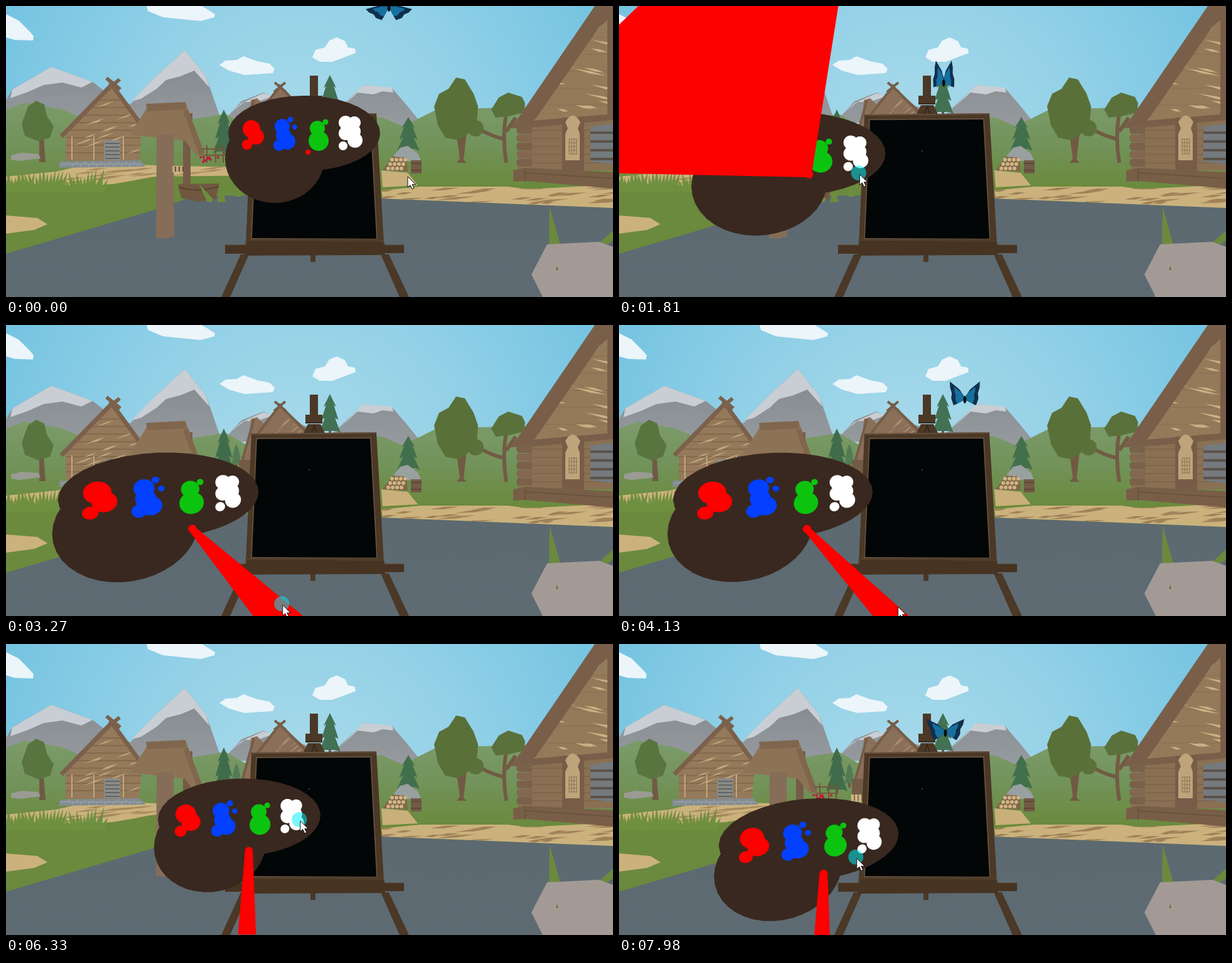
Write an HTML page with a canvas that moves like this. It is 967 by 464 pixels and loops after 8 s.

```html
<!DOCTYPE html>
<html lang="en">
<head>
<meta charset="utf-8">
<title>Palette and easel</title>
<style>
html, body { margin: 0; width: 100%; height: 100%; overflow: hidden; background: #5d6a72; }
canvas { display: block; width: 100vw; height: 100vh; }
</style>
</head>
<body>
<canvas id="stage" width="967" height="464"></canvas>
<script>
const W = 967, H = 464, LOOP = 8000, TAU = Math.PI * 2;
const ctx = document.getElementById('stage').getContext('2d');
const scene = document.createElement('canvas');
scene.width = W;
scene.height = H;
const bg = scene.getContext('2d');

let seed = 7;
const rand = () => (seed = (seed * 16807) % 2147483647) / 2147483647;

// ---- Scenery, painted once ----

function fill(color, d) {
  bg.fillStyle = color;
  bg.fill(new Path2D(d));
}
function line(color, width, d) {
  bg.strokeStyle = color;
  bg.lineWidth = width;
  bg.stroke(new Path2D(d));
}
function rows(color, width, x0, x1, y0, y1, step) {
  for (let y = y0; y <= y1; y += step) line(color, width, `M${x0} ${y}H${x1}`);
}
function disc(color, x, y, r) {
  bg.fillStyle = color;
  bg.beginPath();
  bg.arc(x, y, r, 0, TAU);
  bg.fill();
}
function gradient(y0, y1, ...colors) {
  const g = bg.createLinearGradient(0, y0, 0, y1);
  colors.forEach((c, i) => g.addColorStop(i / (colors.length - 1), c));
  return g;
}
// Thin tapered slivers scattered inside a clip shape.
function streaks(color, clip, n, x, y, w, h, len, tilt, thick) {
  bg.save();
  bg.clip(new Path2D(clip));
  for (let i = 0; i < n; i++) {
    const sx = x + rand() * w, sy = y + rand() * h, l = len * (.4 + rand());
    fill(color, `M${sx} ${sy}l${l / 2} ${l * tilt / 2 - thick}l${l / 2} ${l * tilt / 2 + thick}l${-l / 2} ${thick - l * tilt / 2}Z`);
  }
  bg.restore();
}
function grass(x, y, n, spread, height) {
  for (let i = 0; i < n; i++) {
    const lean = (i / (n - 1) - .5) * spread, h = height * (.5 + .5 * rand());
    fill('#6f903f', `M${x + lean * .7 - 5} ${y}L${x + lean} ${y - h}L${x + lean * .7 + 5} ${y}Z`);
  }
}
function pine(x, y, w, h, color) {
  let left = '', right = '';
  for (let i = 1; i <= 3; i++) {
    const yy = y + h * i / 3, half = w * (.2 + i * .1);
    right += `L${x + half} ${yy}L${x + half * .6} ${yy - 3}`;
    left = `L${x - half * .6} ${yy - 3}L${x - half} ${yy}` + left;
  }
  fill('#6c5843', `M${x - 2} ${y + h - 4}h4v8h-4Z`);
  fill(color, `M${x} ${y}${right}${left}Z`);
}

function sky() {
  const g = bg.createRadialGradient(470, 240, 40, 470, 240, 540);
  ['#a9daea', '#91d0e7', '#73c3e1'].forEach((c, i) => g.addColorStop(i / 2, c));
  bg.fillStyle = g;
  bg.fillRect(0, 0, W, H);
  const cloud = '#ebf5fa';
  fill(cloud, 'M0 13L20 23 38 41 44 48 43 55 14 54 0 50Z');
  fill(cloud, 'M224 0L226 8 250 18 310 24 332 18 333 13 312 0Z');
  fill(cloud, 'M340 94L350 87 368 86 378 80 400 88 420 92 428 100 425 107 380 110 355 103Z');
  fill(cloud, 'M488 82L493 70 508 66 515 55 527 50 540 56 545 66 556 68 557 75 520 89 500 89Z');
}

function mountains() {
  const rock = gradient(80, 200, '#84898f', '#979ca0'), snow = '#c8ced4';
  fill(rock, 'M0 150L10 133 72 97 138 121 175 150 210 160 210 210 0 210Z');
  fill(snow, 'M7 147L10 133 72 97 138 121 120 130 90 122 60 126 35 137Z');
  fill(rock, 'M195 160L238 113 285 70 319 113 342 180 342 200 195 200Z');
  fill(snow, 'M200 152L238 113 285 70 319 113 324 130 300 103 278 112 255 118 240 132 215 148Z');
  fill(rock, 'M345 185L375 152 410 138 425 145 490 165 490 190Z');
  fill(snow, 'M358 170L375 155 410 139 425 144 400 153 380 153Z');
  fill(rock, 'M515 178L570 126 615 131 640 160 668 195 515 200Z');
  fill(snow, 'M534 162L569 126 615 130 617 138 600 136 585 141 560 138Z');
}

function land() {
  fill(gradient(150, 290, '#7c9c6b', '#72935b', '#6a8a3c'),
    'M0 165L30 154 90 165 130 182 200 185 300 180 350 172 390 195 530 172 600 178 632 192 690 163 760 163 850 160 967 200V330H0Z');
  const road = 'M0 272L80 264 110 257 200 253 400 258V275H220L170 288 0 290Z';
  fill('#cbb27d', road);
  streaks('#a5875d', road, 24, 0, 258, 380, 28, 50, -.12, 1.5);
  fill('#6b8a3d', 'M0 286L80 289 170 284 240 272 400 270V310L240 340 0 400Z');
  fill(gradient(300, 464, '#5c6970', '#5e6b73'), 'M0 395L240 324 300 303 390 302 600 307 967 322V464H0Z');
  const lane = 'M598 294L660 288 800 288 830 292 967 285V322L600 307Z';
  fill('#cbb27d', lane);
  streaks('#a08158', lane, 34, 590, 288, 380, 30, 50, -.1, 2);
  fill('#c9b07a', 'M598 262L640 266 656 286 600 289Z');
  fill('#cbb27d', 'M0 334L50 338 66 348 45 357 0 363Z');
}

function trees() {
  fill('#6f5a45', 'M53 210h7l3 39h-10Z');
  fill('#59753f', 'M25 188L35 160 48 151 61 157 65 175 76 192 70 210 52 216 30 207Z');
  pine(347, 165, 34, 70, '#416c4b');
  pine(367, 190, 18, 35, '#527b55');
  pine(516, 110, 34, 62, '#427153');
  pine(641, 177, 36, 54, '#426f4c');
  line('#725b44', 6, 'M797 170Q790 210 797 250M793 212Q775 208 757 198M797 200L812 178');
  fill('#5b713b', 'M773 165L785 146 800 138 822 145 827 155 825 170 800 176 780 178Z');
  disc('#5b713b', 748, 195, 13);
  fill('#715a43', 'M717 200H734L729 245 734 250H718L723 243Z');
  fill('#5a7039', 'M682 160L690 140 705 132 717 114 731 117 745 140 752 160 750 185 735 205 720 214 700 210 688 190Z');
  fill('#9a9b93', 'M8 238L25 234 52 236 55 243 20 247 8 245Z');
}

function leftHouse() {
  const wall = 'M169 128L216 195 212 247H95V205Z';
  fill('#94795a', wall);
  bg.save();
  bg.clip(new Path2D(wall));
  rows('#7f6549', 1.5, 95, 215, 150, 240, 12);
  bg.restore();
  streaks('#c2a87d', wall, 20, 100, 145, 100, 100, 26, -.35, 1.2);
  for (const x of [105, 140, 187]) line('#c2a87d', 2, `M${x} 208V245`);
  line('#7b614c', 7, 'M172 122L88 208M166 122L212 185');
  line('#7b614c', 6, 'M160 115L182 133M181 117L159 135');
  fill('#8b8b85', 'M156 214h26v32h-26Z');
  rows('#5e6469', 2, 158, 181, 219, 243, 6);
  fill('#838c93', 'M86 248L214 246 222 256 84 258Z');
  line('#a2a9ad', 1, 'M86 252H218');
  for (let x = 100; x < 215; x += 13) line('#a2a9ad', 1, `M${x} 248v4m6 0v5`);
}

function well() {
  fill('#755b46', 'M284 171h13v38h-13ZM282 196h12v88h-12Z');
  fill('#8d7356', 'M226 160L287 156 316 236 303 238 285 215 198 205Z');
  fill('#80664d', 'M223 156L286 153 287 165 225 168ZM282 168L290 165 316 234 308 238Z');
  fill('#856d58', 'M240 205H267L268 368 252 371 239 370Z');
  fill('#705740', 'M274 284L340 283 334 308 305 312 279 306Z');
  line('#59432f', 2, 'M275 289Q305 298 339 288');
  rows('#72563d', 2, 312, 347, 228, 238, 10);
  for (const x of [320, 334, 346]) line('#72563d', 2, `M${x} 222v28`);
  fill('#c2a87d', 'M265 255h18v10h-18Z');
  for (const x of [270, 276, 282]) line('#5f4934', 2, `M${x} 256v8`);
  for (let i = 0; i < 10; i++) disc('#c01c3c', 310 + rand() * 28, 241 + rand() * 8, 2);
}

function midground() {
  fill('#8a6f59', 'M390 150L400 147 410 157 436 128 478 165V200L371 228 388 180Z');
  line('#765d48', 4, 'M438 126L396 180M434 126L478 170M395 150L374 225M428 122L446 137M445 122L427 137');
  streaks('#b99a79', 'M436 134L478 175V200H390V180Z', 9, 395, 145, 75, 45, 24, -.8, 1);
  fill('#745b45', 'M371 215h20v35h-20Z');
  fill('#99a0a0', 'M612 246L628 226 640 223 656 235 662 248Z');
  fill('#80664a', 'M600 262L616 240 638 242 640 264Z');
  fill('#715a46', 'M645 246h17v21h-17Z');
  rows('#544332', 1.5, 645, 662, 251, 262, 11);
  for (let row = 0; row < 3; row++)
    for (let i = 0; i < 4; i++) {
      disc('#cfb583', 609 + row * 3 + i * 7, 259 - row * 7, 3);
      if (i < 3) disc('#cfb583', 372 + i * 6, 250 - row * 4, 2.5);
    }
}

function rightHouse() {
  fill('#8a7053', 'M967 10L925 60 835 185 815 262H967Z');
  const gable = 'M962 12L960 178 832 186Z';
  fill('#957a5a', gable);
  for (let y = 50; y < 170; y += 27) line('#876c50', 1.2, `M${958 - y * .7} ${y}H960`);
  streaks('#ccb184', gable, 12, 845, 40, 110, 135, 42, .22, 2);
  fill('#795f49', 'M938 0H967V14L945 34 845 178 830 194 803 195 813 183Z');
  fill('#795f49', 'M958 10h9v172h-9ZM826 184L967 172V182L836 194Z');
  for (let y = 198; y < 262; y += 13) {
    line('#7c624a', 1.5, `M838 ${y}H967`);
    fill(y % 2 ? '#826850' : '#7a614a', `M816 ${y - 6}Q810 ${y} 816 ${y + 6}H838V${y - 6}Z`);
  }
  fill('#785e47', 'M808 262L828 258 967 265V291L828 279 808 280Z');
  line('#674f3b', 1.5, 'M828 266L967 275M827 258V280');
  fill('#775d47', 'M886 178h35v85h-35Z');
  fill('#bfa47b', 'M891 185Q903 164 915 185L911 195 914 204V246H891V204L895 195Z');
  rows('#8a7152', 1, 897, 910, 212, 236, 6);
  for (let x = 897; x < 911; x += 4) line('#8a7152', 1, `M${x} 212v24`);
  fill('#747a7e', 'M931 192L967 188V252L931 248Z');
  rows('#5b5249', 4, 931, 967, 202, 244, 14);
}

function foreground() {
  for (const x of [15, 60, 125]) grass(x, 297, 13, 75, 40);
  fill('#6d8d3e', 'M307 283L330 308 327 313 320 312ZM336 313L343 288 350 312ZM365 304L370 263 375 304Z');
  fill('#6c8a3d', 'M866 320L883 380H865ZM967 358L946 377 958 380 967 374Z');
  fill('#a39a96', 'M837 428L862 380 945 376 967 384V464H855Z');
  fill('#5e7a3c', 'M878 414l2 7h-4Z');
}

function easel() {
  const wood = '#4b3826';
  fill(wood, 'M484 111H497V143H504V157H477V143H484ZM481 158H501L509 174H473Z');
  line('#30251b', 1.5, 'M477 156H504M487 172L491 160 495 172');
  fill(wood, 'M374 396H387L357 464H343ZM597 396H610L642 464H627ZM485 397H493V408H485Z');
  fill(wood, 'M391 173L590 171 602 378 382 381Z');
  line('#6a5440', 1.5, 'M392 174L589 172M399 181L581 180 591 371 391 371Z');
  fill('#020607', 'M400 182L580 181 590 371 392 370Z');
  fill('#463321', 'M382 372L602 375 604 397 380 398ZM349 381H634V394L349 395Z');
  line('#5d4833', 1.2, 'M349 381H382L384 373 601 375 604 381H633');
  disc('#9a9a9a', 483, 231, .8);
}

[sky, mountains, land, trees, leftHouse, well, midground, rightHouse, foreground, easel].forEach(draw => draw());

// ---- Moving parts ----

// Each brush pose: tip on the palette, then butt and half-edge vectors from the tip.
const BRUSH = {
  hidden: [481, 233, 0, 0, 1, 0],
  overhead: [482, 233, -201, -291, 296, -285],
  slanted: [499, 253, 164, 170, 33, 0],
  hanging: [481, 255, -3, 130, 14, 0]
};
// The palette circles the viewer: yaw in radians, drop in pixels, pointer in palette space.
const poses = [
  { t: 0, yaw: 0, drop: 0, pointer: [640, 272], brush: BRUSH.hidden },
  { t: 820, yaw: 0, drop: -2, pointer: [605, 250], brush: BRUSH.hidden },
  { t: 1150, yaw: -.005, drop: -2.5, pointer: [593, 241], brush: BRUSH.overhead },
  { t: 2310, yaw: -.69, drop: 55, pointer: [529, 232], brush: BRUSH.overhead },
  { t: 3360, yaw: -.468, drop: 64, pointer: [640, 400], brush: BRUSH.slanted },
  { t: 4130, yaw: -.468, drop: 64, pointer: [640, 400], brush: BRUSH.slanted },
  { t: 4700, yaw: -.55, drop: 82, pointer: [459, 204], brush: BRUSH.hanging },
  { t: 5680, yaw: -.547, drop: 81, pointer: [459, 204], brush: BRUSH.hanging },
  { t: 5950, yaw: -.547, drop: 81, pointer: [562, 211], brush: BRUSH.hanging },
  { t: 7080, yaw: .654, drop: 47, pointer: [562, 211], brush: BRUSH.hanging },
  { t: LOOP, yaw: -.369, drop: 102, pointer: [529, 237], brush: BRUSH.hanging }
];

const mix = (a, b, p) => Array.isArray(a) ? a.map((v, i) => mix(v, b[i], p)) : a + (b - a) * p;
const smooth = p => p * p * (3 - 2 * p);

function poseAt(t) {
  const i = poses.findIndex(pose => pose.t > t), a = poses[i - 1], b = poses[i];
  const p = smooth((t - a.t) / (b.t - a.t));
  const pose = { dragging: Math.abs(b.yaw - a.yaw) > .2 };
  for (const key of ['yaw', 'drop', 'pointer', 'brush']) pose[key] = mix(a[key], b[key], p);
  return pose;
}

// 60 degree camera looking at a board that always faces it from a fixed distance.
const CX = W / 2, CY = H / 2, FOCAL = CY / Math.tan(Math.PI / 6);
function project([x, y], { yaw, drop }) {
  const p = (x - CX) / FOCAL, depth = Math.cos(yaw) - p * Math.sin(yaw);
  return [CX + FOCAL * (Math.sin(yaw) + p * Math.cos(yaw)) / depth, CY + (y - CY + drop) / depth];
}

function polygon(color, points) {
  ctx.beginPath();
  points.forEach(p => ctx.lineTo(...p));
  ctx.fillStyle = color;
  ctx.fill();
}
function oval(color, pose, x, y, rx, ry = rx) {
  const ring = Array.from({ length: 40 }, (_, i) =>
    project([x + rx * Math.cos(TAU * i / 40), y + ry * Math.sin(TAU * i / 40)], pose));
  polygon(color, ring);
}

// Every paint is a cluster of overlapping drops: x, y, radius.
const paints = {
  '#fd0000': [[391, 196, 14], [398, 208, 13], [384, 221, 8]],
  '#0340ff': [[440, 192, 12], [442, 206, 12], [448, 216, 13], [435, 222, 9], [453, 181, 4.5], [460, 193, 4]],
  '#0cc40f': [[496, 195, 12], [498, 215, 16], [509, 185, 4.5]],
  '#ffffff': [[541, 186, 11], [555, 186, 10], [541, 203, 11], [553, 200, 12], [556, 214, 12], [537, 223, 7]]
};

function drawPalette(pose) {
  oval('#39281f', pose, 475, 203, 121, 60);
  oval('#39281f', pose, 428, 243, 79, 71);
  for (const color in paints) paints[color].forEach(drop => oval(color, pose, ...drop));
}

function drawBrush(pose) {
  const [tx, ty, bx, by, ex, ey] = pose.brush;
  const [x, y] = project([tx, ty], pose), scale = 1 / Math.cos(pose.yaw);
  const r = (pose.brush[3] ? 6 : 4) * scale, len = Math.hypot(ex, ey);
  const nx = ex / len * r, ny = ey / len * r;
  polygon('#fd0000', [
    [x - nx, y - ny], [x + (bx - ex) * scale, y + (by - ey) * scale],
    [x + (bx + ex) * scale, y + (by + ey) * scale], [x + nx, y + ny]
  ]);
  ctx.beginPath();
  ctx.arc(x, y, r, 0, TAU);
  ctx.fill();
}

const FLIGHT = 3370, FLAP = FLIGHT / 10;
const flight = [ // time, x, y
  [0, 610, 3], [350, 611, 45], [760, 551, 119], [1240, 520, 142],
  [2310, 515, 106], [2800, 580, -60], [3200, 606, -60], [FLIGHT, 610, 3]
];
const wing = [[1, -4], [15, -7], [36, -3], [31, 5], [24, 10], [21, 18], [12, 24], [9, 19], [1, 3]];

function drawButterfly(t) {
  const phase = t % FLIGHT, i = flight.findIndex(key => key[0] > phase);
  const a = flight[i - 1], b = flight[i];
  const [, x, y] = mix(a, b, (phase - a[0]) / (b[0] - a[0]));
  const angle = .55 + .72 * Math.cos(TAU * (t - 1160) / FLAP);
  const sin = Math.sin(angle), cos = Math.cos(angle);
  for (const side of [-1, 1])
    for (const [color, size] of [['#10304c', 1], ['#17709f', .7]])
      polygon(color, wing.map(([s, c]) => [
        x + side * size * (s * cos + c * sin * .5 + 1),
        y + size * (c * .75 - s * sin)
      ]));
  ctx.fillStyle = '#0a0d12';
  ctx.beginPath();
  ctx.ellipse(x, y, 2.5, 6, 0, 0, TAU);
  ctx.fill();
}

const arrow = new Path2D('M0 0V17L4 13.500 7 20 10 18.500 7 12.500H12.500Z');
function drawCursor(pose) {
  const [x, y] = project(pose.pointer, pose);
  ctx.save();
  ctx.translate(x, y);
  if (pose.dragging) {
    ctx.fillStyle = 'rgba(0,240,250,.52)';
    ctx.beginPath();
    ctx.arc(-1.5, -2, 12, 0, TAU);
    ctx.fill();
  }
  ctx.fillStyle = '#fff';
  ctx.strokeStyle = '#111';
  ctx.fill(arrow);
  ctx.stroke(arrow);
  ctx.restore();
}

const start = performance.now();
function frame() {
  const t = (performance.now() - start) % LOOP, pose = poseAt(t);
  ctx.drawImage(scene, 0, 0);
  drawButterfly(t);
  drawPalette(pose);
  drawBrush(pose);
  drawCursor(pose);
  requestAnimationFrame(frame);
}
frame();
</script>
</body>
</html>
```
